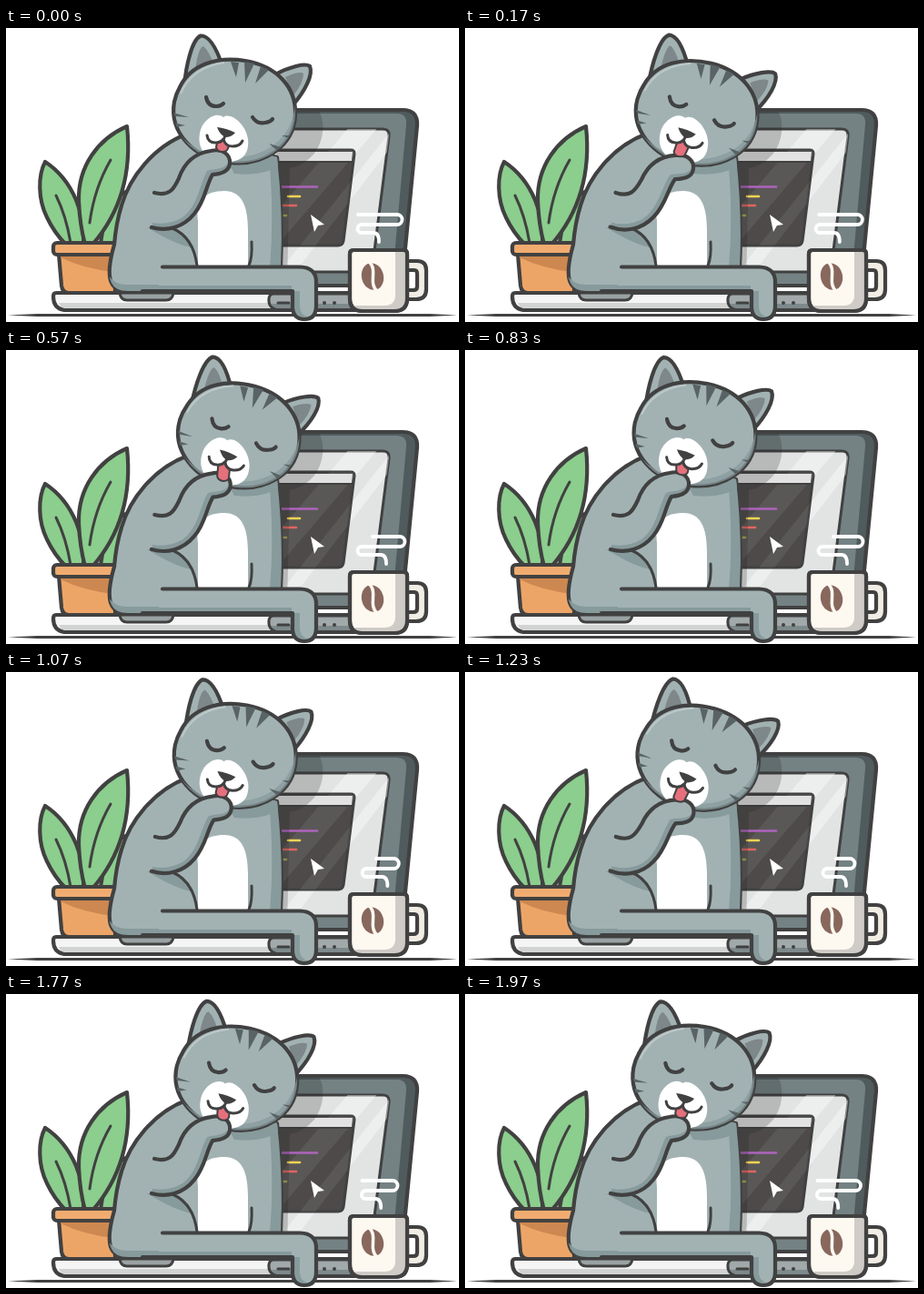
Write an HTML page that moves like this. It is 498x323 px and loops after 2010 ms.

```html
<!DOCTYPE html>
<html lang="en">
<head>
<meta charset="utf-8">
<title>Cat at a laptop</title>
<style>
html, body { margin: 0; width: 100%; height: 100%; overflow: hidden; background: #fff; }
svg { display: block; width: 498px; height: 323px; }
.ink { stroke: #414141; stroke-width: 4.2; stroke-linecap: round; stroke-linejoin: round; }
.line { fill: none; }
.thin { stroke-width: 3; }
.hair { stroke-width: 2; }
.fur { fill: #a2b2b3; }
.dim { fill: #879a9c; }
.stripe { fill: #596365; }
.leaf { fill: #8bce8d; }
</style>
</head>
<body>
<svg viewBox="0 0 498 323">
  <defs>
    <clipPath id="shellClip"><path d="M290 92H436Q452 92 450 108L436 262Q434 282 417 282H290Z"/></clipPath>
    <clipPath id="screenClip"><path d="M290 111H414Q422 111 421 119L403 260Q402 268 394 268H290Z"/></clipPath>
    <clipPath id="windowClip"><path id="window" d="M290 134H379Q383 134 383 138L371 234Q370 239 365 239H290Z"/></clipPath>
    <clipPath id="headClip"><use href="#skull"/></clipPath>
    <clipPath id="bodyClip"><use href="#torso"/></clipPath>
    <clipPath id="mugClip"><use href="#mugBody"/></clipPath>
    <g id="glare" fill="#fff">
      <path d="M378 108H410L292 246V208Z"/>
      <path d="M421 116V134L318 268H300Z"/>
    </g>
  </defs>

  <!-- ground -->
  <path fill="#414141" d="M2 315.500L34 314H466L496 315.500L466 317H34Z"/>

  <!-- plant -->
  <g>
    <path class="ink leaf" d="M132 180Q112 188 108 212L104 236H122Z"/>
    <path class="ink leaf" d="M43 147C35 162 35 188 45 208Q53 225 66 238H85C88 208 75 168 43 147Z"/>
    <path class="ink line thin" d="M55 184Q66 206 71 236"/>
    <path class="ink leaf" d="M133 108C101 122 79 152 80 190Q81 216 87 238H95C122 207 139 164 133 108Z"/>
    <path class="ink line thin" d="M115 145Q97 176 92 214"/>
    <path class="ink" fill="#eda567" d="M58 248H120V291H69Q62 291 61 283Z"/>
    <path fill="#cc8850" d="M60 250H118V268Q84 264 60 252Z"/>
    <rect class="ink" fill="#f0ac70" x="52" y="236" width="72" height="13" rx="4"/>
  </g>

  <!-- laptop lid -->
  <path class="ink" fill="#505b5d" d="M290 90H436Q453 90 452 107L437 262Q435 283 417 283H290Z"/>
  <path fill="#748284" d="M290 94H430Q441 94 440 106L426 262Q424 281 409 281H290Z"/>
  <path class="ink thin" fill="#e2e4e4" d="M290 111H414Q422 111 421 119L403 260Q402 268 394 268H290Z"/>
  <use href="#glare" clip-path="url(#screenClip)" opacity=".4"/>
  <use href="#window" class="ink thin" fill="#4d4a49"/>
  <use href="#glare" clip-path="url(#windowClip)" opacity=".08"/>
  <path fill="#e2e2e2" d="M290 136H381L380 146H290Z"/>
  <path class="ink line hair" d="M300 147H380"/>
  <g fill="none" stroke-width="2.6" stroke-linecap="round">
    <path stroke="#ae63bd" d="M300 174.500H342"/>
    <path stroke="#f1d453" d="M310 185H323"/>
    <path stroke="#e0655f" d="M300 195H319"/>
    <path stroke="#a9a552" d="M300 206H308"/>
  </g>
  <path fill="#fff" d="M335 205L350 216L343 217L339 224Z"/>
  <path clip-path="url(#shellClip)" fill="#222" opacity=".22" d="M300 88H342C352 101 350 124 338 139Q326 152 312 154L309 282H290Z"/>

  <!-- laptop base -->
  <path class="ink" fill="#f5f5f5" d="M55 291H420V310H64Q52 308 52 295Q52 291 55 291Z"/>
  <path fill="#d2d4d4" d="M58 302H290V308H65Q60 307 58 302Z"/>
  <path class="ink thin" fill="#a1a9aa" d="M294 292H400V309H297Q288 307 289 297Q290 292 294 292Z"/>
  <path fill="#7d898b" d="M292 303H400V308H298Q293 307 292 303Z"/>
  <path class="ink line thin" d="M299 302H311"/>
  <g fill="#414141"><circle cx="350" cy="302" r="2"/><circle cx="361" cy="302" r="2"/></g>
  <path class="ink thin" fill="#9aa2a3" d="M125 291H184Q183 299 176 299H133Q126 299 125 291Z"/>

  <!-- cat body -->
  <path id="torso" class="ink fur" d="M200 116C162 130 136 164 127 195Q121 214 119 238C115 252 111 270 116 280Q120 289 134 289H302V262Q305 205 298 142Z"/>
  <g clip-path="url(#bodyClip)">
    <path class="dim" d="M289 140H306V264H290Q295 205 289 140Z"/>
    <path class="dim" d="M240 140H306V148Q284 164 251 160Z"/>
    <path class="dim" d="M110 266Q116 283 136 282H304V292H108Z"/>
    <path fill="#fff" d="M211 264V212C208 190 218 179 240 179C259 179 266 195 266 222V264Z"/>
    <path class="dim" d="M155 219Q186 238 204 241Q199 224 182 219Z"/>
  </g>
  <path class="ink line thin" d="M183 220Q206 230 210 261M270 235Q271 252 267 261"/>
  <path class="fur" d="M168 264H323Q341 264 341 279V305Q341 320 328 320Q314 320 315 303V290H168Z"/>
  <path class="dim" d="M168 283H314V289H168ZM316 289H323V306Q323 315 333 318Q316 323 316 304Z"/>
  <path class="ink line" d="M172 262.500H323Q341 263 341 279V305Q341 320 328 320Q314 320 315 303V289H150"/>

  <!-- cat head -->
  <g class="head">
    <path class="ink fur" d="M196 63C198 42 204 13 214 8.500C224 8 232 24 238 42Z"/>
    <path fill="#7e8789" d="M208 49C209 34 213 20 217 20Q223 25 228 39Z"/>
    <path class="ink fur" d="M296 51C311 43 329 38 334 42C338 51 329 69 315 85Z"/>
    <path fill="#7e8789" d="M307 54Q322 47 327 50Q327 60 316 74Z"/>
    <path id="skull" class="ink fur" d="M191 65C203 40 232 31 263 36C298 42 319 65 318 95C317 130 283 152 246 148C206 144 179 114 185 81Q187 72 191 65Z"/>
    <g clip-path="url(#headClip)">
      <path class="dim" d="M318 82C316 120 287 142 250 142C220 142 198 129 184 108V152H322Z" opacity=".75"/>
      <path class="line" stroke="#bdc8c9" stroke-width="2" d="M192 72C201 51 219 41 240 38"/>
      <path fill="#fff" d="M239 98C247 92 264 106 266 122C268 142 256 148 239 147C220 146 210 132 213 116C215 102 230 91 239 98Z"/>
      <g class="stripe">
        <path d="M247 37L256 38L253 54Z"/>
        <path d="M262 37L273 39L263 60Z"/>
        <path d="M280 42L289 46L274 61Z"/>
        <path d="M184 93L201 98L186 97Z"/>
        <path d="M185 104L197 107L187 109Z"/>
        <path d="M315 118L303 118L313 122Z"/>
        <path d="M306 132L289 127L301 137Z"/>
      </g>
    </g>
    <path class="ink line" d="M220 76Q222 86 231 86Q236 86 239 83M271 98Q276 106 285 104Q291 103 293 100"/>
  </g>

  <!-- raised arm -->
  <g id="arm">
    <path class="fur" d="M163 181C179 185 184 178 190 165C197 145 211 137 225 135C238 132 247 139 246 149C245 158 236 160 227 161C220 172 219 190 207 204C195 219 177 224 160 219Z"/>
    <path class="dim" d="M244 148C240 156 229 154 221 157C213 171 211 196 194 208Q179 217 161 214V219Q180 225 198 213C216 195 216 174 227 161Q246 161 244 148Z"/>
    <path class="ink line" d="M163 181C179 185 184 178 190 165C197 145 211 137 225 135C238 132 247 139 246 149C245 158 236 160 227 161C220 172 219 190 207 204C195 219 177 224 160 219"/>
  </g>

  <!-- muzzle, in front of the paw -->
  <g class="head">
    <path id="tongue" class="ink hair" fill="#e66f7c"/>
    <path fill="#414141" d="M232 109Q242 110 252 115Q248 120 241 120Q235 117 232 109Z"/>
    <path class="ink line thin" d="M241 118L239 123M221 118Q222 126 230 126Q236 126 239 122Q241 130 249 130Q257 130 260 124"/>
  </g>

  <!-- mug -->
  <path class="ink" fill="#f1ede4" d="M438 256H452Q462 256 462 266V287Q462 298 451 298H438ZM441 266H449Q452 266 452 270V284Q452 288 448 288H441Z" fill-rule="evenodd"/>
  <path id="mugBody" class="ink" fill="#fdf9f1" d="M382 244H437Q441 244 441 248V297Q441 311 427 311H392Q378 311 378 297V248Q378 244 382 244Z"/>
  <path clip-path="url(#mugClip)" fill="#cfcbc6" d="M428 242H444V314H379V305H416Q428 305 428 293Z"/>
  <path class="ink line" d="M382 244H437Q441 244 441 248V297Q441 311 427 311H392Q378 311 378 297V248Q378 244 382 244Z"/>
  <g transform="rotate(-14 403 273)">
    <ellipse cx="403" cy="273" rx="12" ry="15" fill="#88675d"/>
    <path class="line" stroke="#fdf9f1" stroke-width="3.5" d="M403 256C411 268 396 278 404 290"/>
  </g>
  <path id="steam" class="line" stroke="#fff" stroke-width="3.8" stroke-linecap="round" stroke-linejoin="round"/>
</svg>

<script>
const LOOP = 2010, LICK = LOOP / 2;
const $ = id => document.getElementById(id);
const arm = $('arm'), tongue = $('tongue'), steam = $('steam');
const headParts = document.querySelectorAll('.head');
const smooth = u => u * u * (3 - 2 * u);
const soft = u => (smooth(u) + u) / 2;

// Each row: time, then values
const PAW = [[0, 0], [200, 1], [370, .85], [570, .12], [830, 0], [LICK, 0]];
// tip, lean
const TONGUE = [[0, 136, -1], [230, 142, -3], [370, 143, -4], [570, 143, 0], [830, 137, 0], [LICK, 136, -1]];
// top start, right end, left end, foot
const STEAM = [
  [0, 387, 430, 391, 410], [370, 392, 433, 389, 414], [570, 403, 433, 391, 418],
  [830, 405, 432, 393, 420], [1230, 408, 423, 398, 419], [1570, 395, 421, 399, 414],
  [LOOP, 387, 430, 391, 410]
];

function sample(rows, t) {
  let i = 1;
  while (i < rows.length - 1 && rows[i][0] < t) i++;
  const a = rows[i - 1], b = rows[i];
  const u = soft((t - a[0]) / (b[0] - a[0]));
  return a.slice(1).map((v, k) => v + (b[k + 1] - v) * u);
}

function draw(t) {
  const lick = t % LICK, peak = LICK / 3;
  const k = lick < peak ? smooth(lick / peak) : 1 - soft((lick - peak) / (LICK - peak));
  const pose = `translate(${7 * k} ${3.5 * k}) rotate(${8.5 * k} 251 91)`;
  headParts.forEach(part => part.setAttribute('transform', pose));

  const [paw] = sample(PAW, lick);
  arm.setAttribute('transform', `translate(${1.2 * paw} 0) rotate(${5 * paw} 165 200)`);

  const [tip, lean] = sample(TONGUE, lick);
  tongue.setAttribute('d',
    `M232 126Q237 126 239 122Q241 128 245 130L${245 + lean} ${tip - 4}` +
    `Q${244 + lean} ${tip} ${239 + lean} ${tip}Q${233 + lean} ${tip} ${232 + lean} ${tip - 5}Z`);

  const [start, right, left, foot] = sample(STEAM, t);
  steam.setAttribute('d',
    `M${start} 205H${right}a5.5 5.5 0 0 1 0 11H${left}a4.500 4.500 0 0 0 0 9` +
    `H${foot - 6}Q${foot} 225 ${foot} 235`);
}

const origin = performance.now();
function tick() {
  draw((performance.now() - origin) % LOOP);
  requestAnimationFrame(tick);
}
tick();
</script>
</body>
</html>
```
